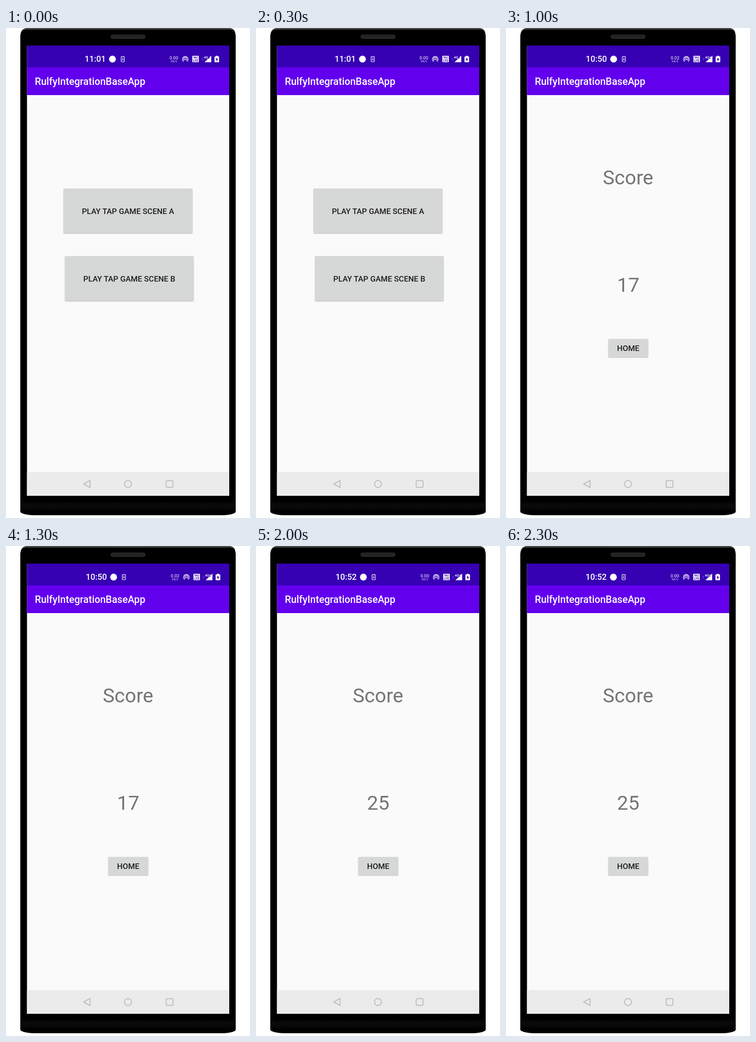
An HTML page for the animation above (2500 ms loop, 529x1059 px).

```html
<!DOCTYPE html>
<html lang="en">
<head>
<meta charset="utf-8">
<title>Tap game</title>
<style>
  html, body { margin: 0; width: 100%; height: 100%; overflow: hidden; background: #fff; }
  svg { display: block; width: 100%; height: 100%; }
  text { font-family: Roboto, sans-serif; }
  .mid { text-anchor: middle; }
  .med { font-weight: 500; }
  .game text { font-family: "Liberation Sans", Arial, sans-serif; text-anchor: middle; }
  .game .slant { font-style: italic; }
  .btn rect { fill: #d6d7d7; filter: drop-shadow(0 1px 1px rgba(0, 0, 0, .3)); }
  .btn text { font-size: 17px; font-weight: 500; fill: #1d1d1d; text-anchor: middle; }
  .score { font-size: 43px; fill: #757575; text-anchor: middle; }
</style>
</head>
<body>
<svg id="stage" viewBox="0 0 529 1059">
  <defs>
    <linearGradient id="top" x1="0" y1="0" x2="0" y2="1">
      <stop offset="0" stop-color="#5a5a5a"/>
      <stop offset=".35" stop-color="#2e2e2e"/>
      <stop offset="1" stop-color="#000"/>
    </linearGradient>
    <linearGradient id="chin" x1="0" y1="0" x2="0" y2="1">
      <stop offset="0" stop-color="#000"/>
      <stop offset=".35" stop-color="#0b0b0b"/>
      <stop offset=".75" stop-color="#060606"/>
      <stop offset="1" stop-color="#000"/>
    </linearGradient>
    <pattern id="mesh" width="3" height="3" patternUnits="userSpaceOnUse">
      <rect width="3" height="3" fill="#2b2b2b"/>
      <circle cx="1.5" cy="1.5" r=".9" fill="#0c0c0c"/>
    </pattern>
  </defs>
  <path d="M31 17Q32 1 46 0H484Q497 1 498 17V1046Q494 1052 470 1053H60Q36 1052 31 1046Z" fill="#000"/>
  <path d="M33 9Q36 1 46 0H484Q494 1 497 9Q492 4 484 4H46Q38 4 33 9Z" fill="url(#top)"/>
  <path d="M32 1022H497V1045H32Z" fill="url(#chin)"/>
  <rect x="227.5" y="15" width="74" height="7.5" rx="3.5" fill="url(#mesh)" stroke="#3a3a3a"/>
  <g id="screens"></g>
</svg>
<script>
const STEP = 500;

const button = (x, y, w, h, label, base) => `
  <g class="btn">
    <rect x="${x}" y="${y}" width="${w}" height="${h}" rx="1.5"/>
    <text x="${x + w / 2}" y="${base}">${label}</text>
  </g>`;

const statusBar = ({ time, speed, net, dx }) => `
  <g transform="translate(${dx} 0)" fill="#fff">
    <text class="med" x="170.5" y="73" font-size="18">${time}</text>
    <circle cx="230.8" cy="67.2" r="7.4"/>
    <rect x="249.7" y="61.6" width="6.8" height="11.4" rx="1" fill="none" stroke="#fff" stroke-width="1.2"/>
    <path d="M253.1 64V69.5M251.3 67.8L253.1 69.7L254.9 67.8" fill="none" stroke="#fff"/>
    <text class="mid" x="364" y="67.6" font-size="9.6">${speed}</text>
    <text class="mid" x="364" y="74" font-size="6" opacity=".85">KB/S</text>
    <g fill="none" stroke="#fff" stroke-width="1.3">
      <path d="M384.8 72.6A6.2 6.2 0 1 1 392.4 72.6"/>
      <path d="M386.3 70.2A3.6 3.6 0 1 1 390.9 70.2"/>
    </g>
    <circle cx="388.6" cy="67.8" r="1.4"/>
    <rect x="404" y="60" width="14" height="14" rx="1"/>
    <g class="mid" fill="#3700b3" font-weight="700" font-size="6.6">
      <text x="411" y="66.4">Vo)</text>
      <text x="411" y="73">LTE</text>
    </g>
    <path d="M424 66.6L425.7 64.6L427.4 66.6ZM424 68.2L425.7 70.2L427.4 68.2Z" opacity=".4"/>
    <path d="M445 59.5V74H430.3L438.5 66H441V63.5Z"/>
    <text class="med" x="429" y="66" font-size="7.4">${net}</text>
    <path d="M455 60H459V61.5H461Q462 61.5 462 62.5V73Q462 74 461 74H453Q452 74 452 73V62.5Q452 61.5 453 61.5H455Z"/>
    <path d="M457.8 63.6L454.2 68.6H456.6V72.4L460 67.2H457.8Z" fill="#3700b3"/>
  </g>`;

const appScreen = (status, body) => `
  <rect x="45.5" y="38" width="438.5" height="973" fill="#fafafa"/>
  <rect x="45.5" y="38" width="438.5" height="47.5" fill="#3700b3"/>
  <rect x="45.5" y="85" width="438.5" height="60" fill="#6200ee"/>
  ${statusBar(status)}
  <text class="med" x="62.5" y="123.3" font-size="21.5" fill="#fff">RulfyIntegrationBaseApp</text>
  ${body}
  <rect x="45.5" y="960" width="438.5" height="51" fill="#ebebeb"/>
  <g fill="none" stroke="#bdbdbd" stroke-width="2" stroke-linejoin="round">
    <path d="M168.3 985.5L182.3 977.8V993.2Z"/>
    <circle cx="264.5" cy="985.5" r="7.6"/>
    <rect x="347.2" y="978.2" width="14.8" height="14.6" rx="2"/>
  </g>`;

const homeScreen = status => appScreen(status,
  button(125, 347, 279, 96, "PLAY TAP GAME SCENE A", 401.6) +
  button(128, 493, 278.5, 96.5, "PLAY TAP GAME SCENE B", 548));

const scoreScreen = (status, score) => appScreen(status, `
  <text class="score" x="264.6" y="337.5">Score</text>
  <text class="score" x="265" y="569.5">${score}</text>
  ${button(222, 672, 86, 39, "HOME", 698)}`);

const gameScreen = (name, best) => `
  <g class="game">
    <rect x="46" y="38.5" width="437.5" height="972" fill="#71839d" stroke="#2f4a70" stroke-width="1.6"/>
    <g font-size="37.5">
      <text x="266" y="100.6" fill="#2b3340" opacity=".85">Scene ${name}</text>
      <text x="264.6" y="99.2" fill="#fff" stroke="#fff" stroke-width=".5">Scene ${name}</text>
    </g>
    <g class="slant" fill="#44e2a0">
      <text x="267" y="258.5" font-size="33">HighScore</text>
      <text x="268.7" y="323.5" font-size="60" stroke="#44e2a0" stroke-width=".5">${best}</text>
    </g>
    <rect x="69.5" y="431" width="390.5" height="402" rx="3" fill="#3d3d3d" stroke="#333c48"/>
    <text class="slant" x="269.3" y="653" font-size="60.5" fill="#5bcdf5" stroke="#5bcdf5" stroke-width=".5">TAP</text>
    <rect x="69.8" y="881.3" width="390" height="105.5" rx="3" fill="#f4f4f4" stroke="#5d6878"/>
    <text x="264.6" y="946" font-size="34.5" fill="#da3c3c">Finish</text>
  </g>`;

const screens = [
  homeScreen({ time: "11:01", speed: "0.00", net: "4G", dx: 0 }),
  gameScreen("A", 50),
  scoreScreen({ time: "10:50", speed: "0.02", net: "4G+", dx: 2.5 }, 17),
  gameScreen("B", 0),
  scoreScreen({ time: "10:52", speed: "0.00", net: "4G+", dx: 2 }, 25)
];

const holder = document.getElementById("screens");
holder.innerHTML = screens.map(s => `<g>${s}</g>`).join("");

// Each screen is on for one step, then off for the rest of the loop.
const loop = STEP * screens.length;
const on = 1 / screens.length;
[...holder.children].forEach((el, i) => el.animate([
  { opacity: 1, offset: 0 },
  { opacity: 1, offset: on },
  { opacity: 0, offset: on },
  { opacity: 0, offset: 1 }
], { duration: loop, delay: i * STEP - loop, iterations: Infinity }));
</script>
</body>
</html>
```
